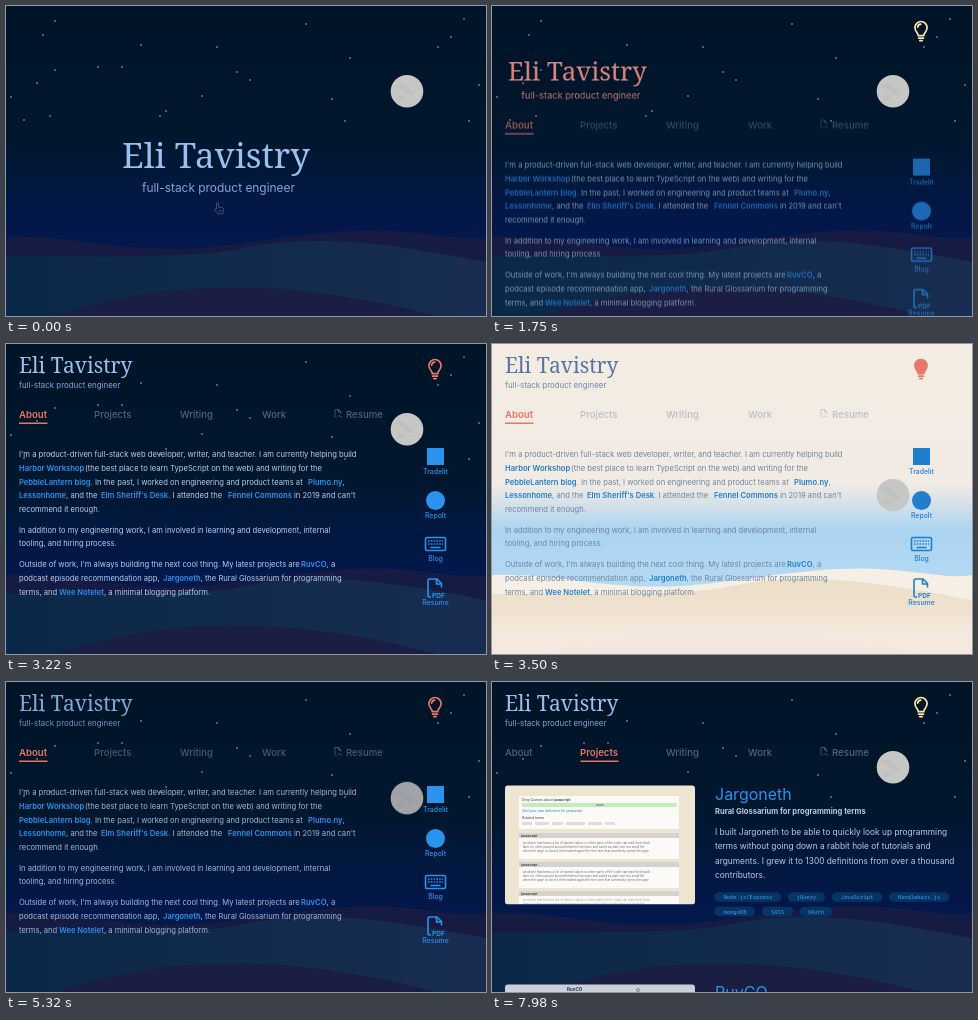
An HTML page that plays this animation: 480 px wide and 310 px high, repeating every 8 s.

```html
<!DOCTYPE html>
<html lang="en">
<head>
<meta charset="utf-8">
<title>Portfolio</title>
<style>
html, body { margin: 0; height: 100%; overflow: hidden; background: #011428; }
svg { display: block; width: 100%; height: 100vh; font-family: Inter, "Open Sans", sans-serif; }
svg * { animation: 0s ease infinite; }

/* one shared 8 s loop: 1% = 80 ms */
.run, .ink, .name { animation-duration: 8s !important; }

.name { font-family: "Noto Serif", serif; font-weight: 500; animation-name: name-ink; }
.ink { animation-name: ink; }
.dim { opacity: .43; }
.red { fill: #ea7566; }
.nav { font-size: 9.6px; font-weight: 500; }
.on { font-weight: 600; }
.copy { font-size: 7.62px; }
.lnk { fill: currentColor; font-weight: 600; }
.label { font-size: 6.9px; font-weight: 500; text-anchor: middle; }
.tag { font: 5.45px "Noto Sans Mono", "DejaVu Sans Mono", monospace; text-anchor: middle; fill: #3aa0f5; }

@keyframes ink { 0%, 40.69% { fill: #b4cdea } 50%, 60.125% { fill: #3c506e } 72.625%, 100% { fill: #b4cdea } }
@keyframes name-ink {
  0%, 9% { fill: #9cc0ee } 13%, 25% { fill: #dc857c } 32%, 40.69% { fill: #9cc0ee }
  50%, 60.125% { fill: #1f3c68 } 72.625%, 100% { fill: #9cc0ee }
}
#links { animation-name: link-tone; }
@keyframes link-tone { 0%, 40.69% { color: #2b92ee } 43.31%, 60.125% { color: #1f7fcb } 61.5%, 100% { color: #2b92ee } }

#day { animation-name: day; }
@keyframes day { 0%, 40.69% { opacity: 0 } 43.31%, 60.125% { opacity: 1 } 62.75%, 100% { opacity: 0 } }
#moon { animation-name: moon-path, moon-fade; }
@keyframes moon-path { 0%, 40.69% { transform: none } 53.19%, 60.125% { transform: translateY(165px) } 72.625%, 100% { transform: none } }
@keyframes moon-fade { 0%, 43.5% { opacity: 1 } 53.19%, 60.125% { opacity: 0 } 72.625%, 100% { opacity: 1 } }
#sun { animation-name: sun-path, sun-fade; }
@keyframes sun-path { 0%, 40.69% { transform: translateY(165px) } 53.19%, 60.125% { transform: none } 72.625%, 100% { transform: translateY(165px) } }
@keyframes sun-fade { 0%, 45% { opacity: 0 } 53%, 60.125% { opacity: 1; animation-timing-function: linear } 63.3%, 100% { opacity: 0 } }

#title-x { animation-name: title-x; }
@keyframes title-x {
  0%, 17.1% { transform: translateX(116px); animation-timing-function: cubic-bezier(0, 1, .1, 1) }
  29.6%, 100% { transform: translateX(13px) }
}
#title-y { animation-name: title-y; }
@keyframes title-y {
  0%, 17.1% { transform: translateY(162px) scale(1.658) }
  29.6%, 100% { transform: translateY(29px) scale(1) }
}
#sub-x { animation-name: sub-x; }
@keyframes sub-x {
  0%, 17.1% { transform: translateX(136px); animation-timing-function: cubic-bezier(.2, .7, .2, 1) }
  29.6%, 100% { transform: translateX(13px) }
}
#sub-y { animation-name: sub-y; }
@keyframes sub-y {
  0%, 17.1% { transform: translateY(186px) scale(1.51) }
  29.6%, 100% { transform: translateY(44px) scale(1) }
}
#hand { animation-name: hand; }
@keyframes hand { 0% { opacity: .45 } 6%, 16% { opacity: .9 } 18%, 100% { opacity: 0 } }

#content { animation-name: rise; }
@keyframes rise {
  0%, 17.1% { transform: translateY(142px); opacity: 0 }
  29.6%, 100% { transform: none; opacity: 1 }
}
.leaving { animation-name: leave; }
@keyframes leave { 0%, 84.8% { opacity: 1 } 86.2%, 100% { opacity: 0 } }
.coming { animation-name: come; }
@keyframes come { 0%, 84.8% { opacity: 0 } 86.2%, 100% { opacity: 1 } }
.hover-on { animation-name: hover-on; }
@keyframes hover-on { 0%, 78.5% { opacity: 0 } 80.5%, 100% { opacity: 1 } }
.hover-off { animation-name: hover-off; }
@keyframes hover-off { 0%, 78.5% { opacity: 1 } 80.5%, 100% { opacity: 0 } }

#bulb { animation-name: bulb-show, bulb-tone; }
@keyframes bulb-show { 0%, 17.1% { opacity: 0 } 21%, 100% { opacity: 1 } }
@keyframes bulb-tone { 0%, 39.2% { color: #ffe6a6 } 40.2%, 71% { color: #e8776c } 73.5%, 100% { color: #ffe6a6 } }
#glass { animation-name: glass; animation-timing-function: step-end; }
@keyframes glass { 0% { fill-opacity: 0 } 41% { fill-opacity: 1 } 60.5%, 100% { fill-opacity: 0 } }
</style>
</head>
<body>
<svg viewBox="0 0 480 310">
  <defs>
    <linearGradient id="night-sky" x2="0" y2="1">
      <stop stop-color="#011428"/><stop offset=".42" stop-color="#01172d"/>
      <stop offset=".58" stop-color="#02183e"/><stop offset=".74" stop-color="#03184b"/>
    </linearGradient>
    <linearGradient id="night-hill">
      <stop stop-color="#0b2848"/><stop offset="1" stop-color="#182d51"/>
    </linearGradient>
    <linearGradient id="day-sky" x2="0" y2="1">
      <stop stop-color="#f3ece3"/><stop offset=".45" stop-color="#f2ebe3"/>
      <stop offset=".53" stop-color="#cfdfea"/><stop offset=".6" stop-color="#abd4f2"/><stop offset=".78" stop-color="#b4d9f3"/>
    </linearGradient>
    <linearGradient id="day-hill" x2="0" y2="1">
      <stop stop-color="#ecdfc7"/><stop offset=".4" stop-color="#eee2cf"/><stop offset=".75" stop-color="#f3e9df"/>
    </linearGradient>
    <path id="far" d="M0 231C60 228 110 246 190 242C250 238 330 219 400 226C440 229 460 235 480 231V310H0Z"/>
    <path id="mid" d="M0 250C90 250 180 252 230 244C290 230 350 230 480 256V310H0Z"/>
    <path id="near" d="M50 310C160 272 290 272 430 310Z"/>
    <path id="bulb-shape" d="M426.3 29.600c0-2.600-3.400-4-3.400-8a6.100 6.100 0 0 1 12.200 0c0 4-3.400 5.400-3.400 8Z"/>
    <text id="tiny" font-size="3" fill="#6d6d70">
      <tspan x="31" y="0">an object that keeps a list of named values so other parts of the code can read them back</tspan>
      <tspan x="31" dy="4.2">later on, often passed around between functions and saved as plain text in a small file</tspan>
      <tspan x="31" dy="4.2">when the page is closed, then loaded again the next time that somebody opens the page</tspan>
    </text>
  </defs>

  <rect width="480" height="310" fill="url(#night-sky)"/>
  <path id="stars" fill="none" stroke="#bfc9d5" stroke-width="1.5" stroke-linecap="round"
    d="M49 15h0M37 29h0M135 39h0M211 41h0M300 18h0M458 13h0M432 41h0M445 31h0M344 52h0M231 66h0M244 74h0M92 61h0M116 61h0M49 64h0M31 77h0M5 91h0M18 114h0M44 110h0M154 110h0M160 105h0M196 90h0M326 93h0M339 115h0M463 115h0M473 79h0"/>
  <use href="#far" fill="#151b42"/>
  <use href="#mid" fill="url(#night-hill)"/>
  <use href="#near" fill="#191e42"/>

  <g id="day" class="run">
    <rect width="480" height="310" fill="url(#day-sky)"/>
    <use href="#far" fill="#f5efe6"/>
    <use href="#mid" fill="url(#day-hill)"/>
    <use href="#near" fill="#f3e8df"/>
  </g>

  <circle id="sun" class="run" cx="72" cy="60" r="18.300" fill="#fbf8c2"/>
  <g id="moon" class="run">
    <circle cx="401" cy="85.300" r="16.300" fill="#c6c6c5"/>
    <path d="M388 80q7-5 12 0t9 8q-6 3-10-2t-11-6Z" fill="#b9bbbb" opacity=".6"/>
    <ellipse cx="395" cy="92" rx="4" ry="2.500" fill="#bfc0c0"/>
  </g>

  <g class="name">
    <g id="title-x" class="run"><g id="title-y" class="run"><text font-size="21">Eli Tavistry</text></g></g>
    <g id="sub-x" class="run"><g id="sub-y" class="run">
      <text font-size="7.9" font-weight="400" opacity=".85" style="font-family:Inter,sans-serif">full-stack product engineer</text>
    </g></g>
  </g>
  <path id="hand" class="run" fill="none" stroke="#8299ba" stroke-width="1" stroke-linejoin="round"
    d="M210.500 203v-6q1-1.500 2 0v4l4 .8q1.500.4 1.200 2l-.8 4h-5l-3.500-4q0-1.600 2.100-.8M213 204v2M215 204v2"/>

  <g id="bulb" class="run" fill="currentColor" stroke="currentColor" stroke-width="1.700" stroke-linecap="round">
    <use id="glass" class="run" href="#bulb-shape"/>
    <path fill="none" d="M426.600 32.200h4.800M427.800 34.600h2.400M425.700 21.200a3.300 3.300 0 0 1 3-3"/>
  </g>

  <g id="content" class="run">
    <g class="nav">
      <g class="ink">
        <g class="run coming"><text class="dim" x="13" y="73.500">About</text></g>
        <g class="run hover-off"><text class="dim" x="88" y="73.500">Projects</text></g>
        <g class="dim">
          <text x="174" y="73.500">Writing</text>
          <text x="256" y="73.500">Work</text>
          <text x="340" y="73.500">Resume</text>
        </g>
      </g>
      <path class="dim" d="M329 73.500v-8h3.500l2.300 2.300v2M332.500 65.500v2.500h2.300M331 73.500l2-2 3 2" fill="none" stroke="#8aa5c8"/>
      <g class="red on">
        <g class="run leaving"><text x="13" y="73.500">About</text><path d="M13 78.500h28.500v1.500H13z"/></g>
        <text class="run hover-on" x="88" y="73.500">Projects</text>
        <path class="run coming" d="M88.500 78.500h38v1.500h-38z"/>
      </g>
    </g>

    <g class="run leaving"><g id="links" class="run">
      <g class="copy ink">
        <text x="13" y="113">I'm a product-driven full-stack web developer, writer, and teacher. I am currently helping build</text>
        <text y="127"><tspan class="lnk" x="13">Harbor Workshop</tspan><tspan x="79">(the best place to learn TypeScript on the web) and writing for the</tspan></text>
        <text y="140.500"><tspan class="lnk" x="13">PebbleLantern blog</tspan>. In the past, I worked on engineering and product teams at <tspan class="lnk" x="302">Plumo.ny</tspan>,</text>
        <text y="154"><tspan class="lnk" x="13">Lessonhome</tspan>, and the <tspan class="lnk" x="95">Elm Sheriff's Desk</tspan>. I attended the <tspan class="lnk" x="222">Fennel Commons</tspan> in 2019 and can't</text>
        <text x="13" y="167.500">recommend it enough.</text>
        <text x="13" y="188.500">In addition to my engineering work, I am involved in learning and development, internal</text>
        <text x="13" y="202">tooling, and hiring process.</text>
        <text x="13" y="223">Outside of work, I'm always building the next cool thing. My latest projects are <tspan class="lnk" x="295">RuvCO</tspan>, a</text>
        <text x="13" y="237">podcast episode recommendation app, <tspan class="lnk" x="157">Jargoneth</tspan>, the Rural Glossarium for programming</text>
        <text x="13" y="250.500">terms, and <tspan class="lnk" x="53">Wee Notelet</tspan>, a minimal blogging platform.</text>
      </g>
      <g fill="currentColor">
        <rect x="421" y="104" width="17" height="17"/>
        <circle cx="429.500" cy="156.500" r="9.500"/>
        <g fill="none" stroke="currentColor" stroke-width="1.600">
          <rect x="419.500" y="193.500" width="20" height="13" rx="1.500"/>
          <path d="M422 197h15M422 200h15" stroke-dasharray="1.600 1.200"/>
          <path d="M424.500 203.500h10"/>
          <path d="M425 253h-1.500q-1.500 0-1.500-1.500v-15q0-1.500 1.500-1.500h7.500l4.500 4.500v4M430.500 235v5h5"/>
        </g>
        <text x="426" y="253.500" font-size="6.500" font-weight="700">PDF</text>
        <g class="label">
          <text x="429.500" y="130">Tradelit</text>
          <text x="429.500" y="173.500">Repolt</text>
          <text x="429.500" y="217">Blog</text>
          <text x="429.500" y="260.500">Resume</text>
        </g>
      </g>
    </g></g>

    <g class="run coming">
      <rect x="13" y="103.500" width="190" height="119" rx="3" fill="#eee4d2"/>
      <path d="M27 114h160v33H27zM27 151h160v26H27zM27 180h160v26H27zM27 209h160v13H27z" fill="#fbfaf7"/>
      <path d="M27 151h160v5H27zM27 180h160v5H27zM27 209h160v5H27z" fill="#d5d3d0"/>
      <path d="M30 121h155v4H30z" fill="#bfeebd"/>
      <path d="M30 140h10v3H30zM43 140h14v3H43zM60 140h11v3H60zM74 140h19v3H74zM96 140h14v3H96zM113 140h10v3H113z" fill="#dcdcdc"/>
      <g font-size="3.400" fill="#444">
        <text x="30" y="119">Ding Queries about <tspan font-weight="700">javascript</tspan></text>
        <text x="104" y="124.200">save</text>
        <text x="30" y="130" fill="#3579b5">Add your own definition for javascript</text>
        <text x="30" y="137">Related terms</text>
        <g font-weight="700"><text x="29" y="155">javascript</text><text x="29" y="184">javascript</text><text x="29" y="213">javascript</text></g>
      </g>
      <use href="#tiny" y="162"/><use href="#tiny" y="191"/><use href="#tiny" y="219" opacity=".6"/>
      <path d="M13 222.500h190v7H13z" fill="#03184b"/>

      <text x="223" y="118" font-size="16" fill="#2b92ee">Jargoneth</text>
      <g fill="#b4cdea">
        <text x="223" y="131.500" font-size="7.600" font-weight="700">Rural Glossarium for programming terms</text>
        <g font-size="8.350">
          <text x="223" y="153">I built Jargoneth to be able to quickly look up programming</text>
          <text x="223" y="167.300">terms without going down a rabbit hole of tutorials and</text>
          <text x="223" y="181.700">arguments. I grew it to 1300 definitions from over a thousand</text>
          <text x="223" y="196">contributors.</text>
        </g>
      </g>
      <path d="M227 215h57.500M300.500 215h28M344.500 215h41M401.500 215h51M227 229.500h31.500M274.500 229.500h22M312.500 229.500h23"
        stroke="#073463" stroke-width="9.500" stroke-linecap="round"/>
      <g class="tag">
        <text x="256" y="217">Node.js/Express</text>
        <text x="314.500" y="217">jQuery</text>
        <text x="365" y="217">JavaScript</text>
        <text x="427" y="217">Handlebars.js</text>
        <text x="243" y="231.500">mongoDB</text>
        <text x="285.500" y="231.500">SASS</text>
        <text x="324" y="231.500">OAuth</text>
      </g>

      <rect x="13" y="302.500" width="190" height="20" rx="3" fill="#c9d0dc"/>
      <text x="75" y="309" font-size="4.500" font-weight="700" fill="#23314a">RuvCO</text>
      <circle cx="146" cy="308" r="1.500" fill="none" stroke="#53627c" stroke-width=".7"/>
      <text x="223" y="316" font-size="16" fill="#2b92ee">RuvCO</text>
    </g>
  </g>
</svg>
</body>
</html>
```
